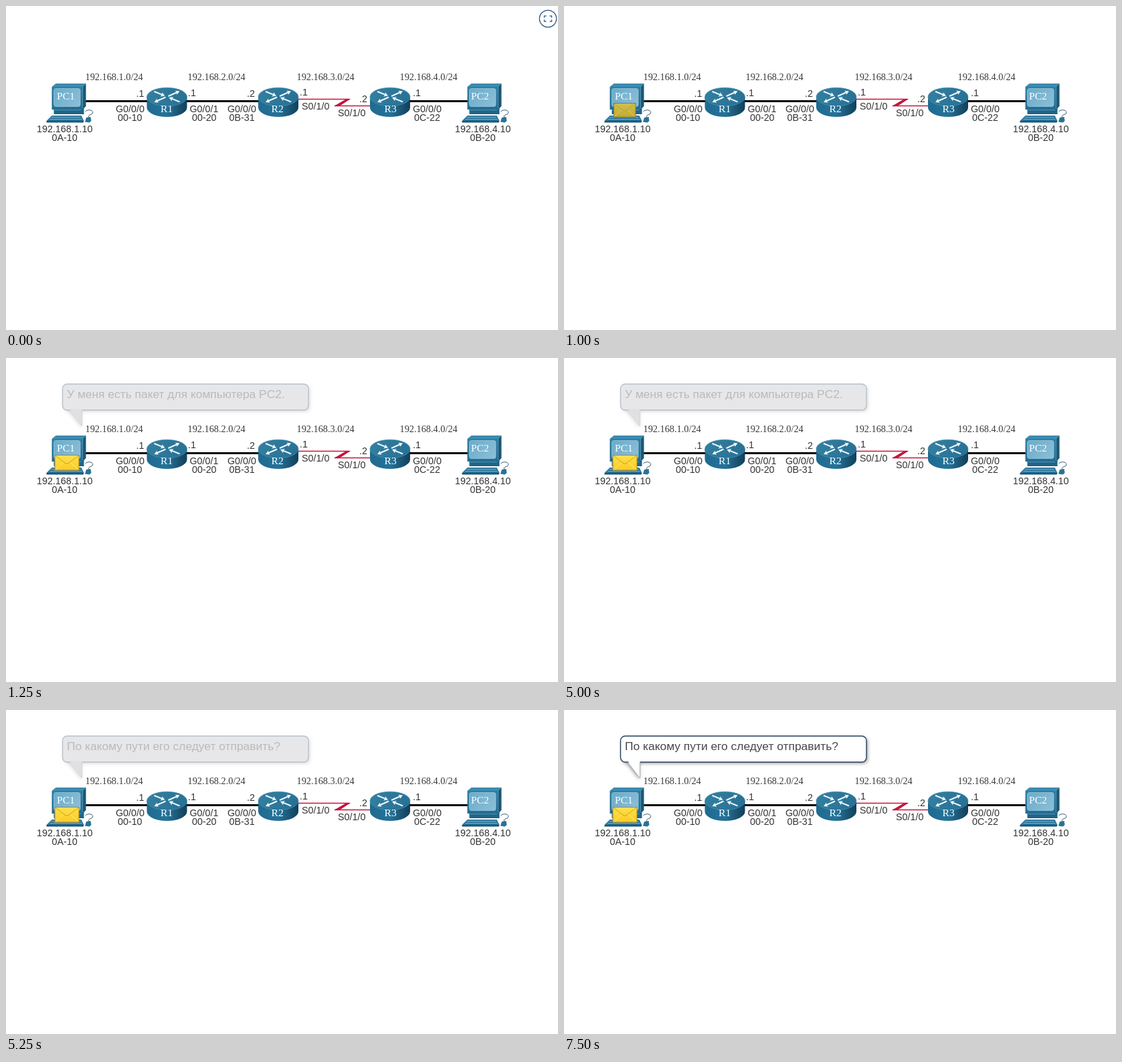
Recreate the animation shown at these times as an HTML page with a canvas. Size 825 by 485 pixels, loop 8 s.

```html
<!DOCTYPE html>
<html lang="ru">
<head>
<meta charset="utf-8">
<title>Packet path</title>
<style>
html, body { margin: 0; width: 100%; height: 100%; overflow: hidden; background: #fff; }
canvas, svg { position: absolute; left: 0; top: 0; width: 825px; height: 485px; }
.sans { font: 14.3px "Liberation Sans", Arial, sans-serif; fill: #333; }
.net { font: 14.3px "Liberation Serif", "Times New Roman", serif; fill: #3a3a3a; }
.dev { font: 15.6px "Liberation Serif", "Times New Roman", serif; fill: #fff; }
#say { font: 17.4px "Liberation Sans", Arial, sans-serif; }
</style>
</head>
<body>
<canvas width="825" height="485"></canvas>
<svg viewBox="0 0 825 485"><g id="labels"></g><text id="say" x="91" y="60"></text></svg>
<script>
const LOOP = 8000;
const ctx = document.querySelector('canvas').getContext('2d');
const say = document.getElementById('say');
const labels = document.getElementById('labels');

function label(cls, x, y, str) {
  const t = document.createElementNS('http://www.w3.org/2000/svg', 'text');
  t.setAttribute('class', cls);
  t.setAttribute('x', x);
  t.setAttribute('y', y);
  t.textContent = str;
  labels.append(t);
}

[118.5, 271.5, 434.5, 588.5].forEach((x, i) => label('net', x, 110.5, `192.168.${i + 1}.0/24`));
[['PC1', 76, 140], ['PC2', 695, 140], ['R1', 231, 159], ['R2', 396.5, 159], ['R3', 565.5, 159]]
  .forEach(([s, x, y]) => label('dev', x, y, s));
[
  ['192.168.1.10', 46, 189], ['0A-10', 68.5, 202],
  ['192.168.4.10', 671, 189], ['0B-20', 693.5, 202],
  ['.1', 194.5, 136], ['G0/0/0', 164, 159], ['00-10', 167, 172],
  ['.1', 272, 135], ['G0/0/1', 274.5, 159], ['00-20', 278, 172],
  ['.2', 360, 136], ['G0/0/0', 331, 159], ['0B-31', 333.5, 172],
  ['.1', 439, 134], ['S0/1/0', 442, 155],
  ['.2', 528, 144], ['S0/1/0', 496, 165],
  ['.1', 608, 135], ['G0/0/0', 608, 159], ['0C-22', 610, 172]
].forEach(([s, x, y]) => label('sans', x, y, s));

function poly(fill, ...pts) {
  ctx.fillStyle = fill;
  ctx.beginPath();
  for (let i = 0; i < pts.length; i += 2) ctx.lineTo(pts[i], pts[i + 1]);
  ctx.closePath();
  ctx.fill();
}

function line(color, width, ...pts) {
  ctx.strokeStyle = color;
  ctx.lineWidth = width;
  ctx.beginPath();
  for (let i = 0; i < pts.length; i += 2) ctx.lineTo(pts[i], pts[i + 1]);
  ctx.stroke();
}

function shade(x0, y0, x1, y1, ...colors) {
  const g = ctx.createLinearGradient(x0, y0, x1, y1);
  colors.forEach((c, i) => g.addColorStop(i / (colors.length - 1), c));
  return g;
}

function box(x, y, w, h, r) {
  ctx.beginPath();
  ctx.roundRect(x, y, w, h, r);
}

function pc(x) {
  ctx.save();
  ctx.translate(x, 0);
  // keyboard and stand
  poly('#1f6488', 3, 153, 48, 153, 48, 162, 3, 162);
  poly('#3f88ab', 3, 155, 44, 155, 44, 156.5, 3, 156.5);
  poly('#2b7499', 0, 164, 44, 164, 48, 172, -8, 172);
  poly('#1a5676', -8, 172, 48, 172, 47, 174.5, -8, 174.5);
  line('#7fb2ca', 1, -1, 166.5, 43, 166.5);
  line('#7fb2ca', 1, -3, 169.5, 45, 169.5);
  // monitor
  poly('#3d8bb0', 0, 121, 6, 116, 51, 116, 46, 121);
  poly('#1a5878', 46, 121, 51, 116, 51, 150, 46, 155);
  poly(shade(0, 121, 0, 155, '#2f7ea3', '#236c90'), 0, 121, 46, 121, 46, 155, 0, 155);
  box(3, 123.5, 39.5, 27, 3);
  ctx.fillStyle = shade(3, 124, 42, 151, '#6aaccb', '#8cbfd8');
  ctx.fill();
  ctx.strokeStyle = '#9ac6da';
  ctx.lineWidth = 0.8;
  ctx.stroke();
  // mouse
  ctx.strokeStyle = '#33576a';
  ctx.lineWidth = 1;
  ctx.beginPath();
  ctx.moveTo(50, 158);
  ctx.bezierCurveTo(55, 153, 64, 157, 60.5, 161);
  ctx.bezierCurveTo(58, 164, 54, 162, 55, 167);
  ctx.stroke();
  poly('#2c7192', 51.5, 167, 58, 166, 59, 172, 56, 174.5, 49.5, 173.5);
  ctx.restore();
}

function arrow(x0, y0, x1, y1) {
  ctx.save();
  ctx.translate(x1, y1);
  ctx.rotate(Math.atan2(y1 - y0, x1 - x0));
  const len = Math.hypot(x1 - x0, y1 - y0);
  poly('#f2f8fb', 0, 0, -6, -3.4, -5, -1, -len, -1, -len, 1, -5, 1, -6, 3.4);
  ctx.restore();
}

function router(x) {
  ctx.save();
  ctx.translate(x, 0);
  ctx.fillStyle = shade(-30, 0, 30, 0, '#206a8f', '#24739a', '#123f59');
  ctx.beginPath();
  ctx.moveTo(-30, 136);
  ctx.lineTo(-30, 152);
  ctx.ellipse(0, 152, 30, 14, 0, Math.PI, 0, true);
  ctx.lineTo(30, 136);
  ctx.fill();
  ctx.fillStyle = shade(-30, 122, 30, 150, '#33809f', '#276f95');
  ctx.beginPath();
  ctx.ellipse(0, 136, 30, 13.8, 0, 0, 7);
  ctx.fill();
  ctx.strokeStyle = '#4a8fb0';
  ctx.lineWidth = 0.7;
  ctx.stroke();
  arrow(-19, 128, -3, 134.5);
  arrow(19, 143.5, 3, 137);
  arrow(2, 135, 19, 127.5);
  arrow(-2, 136.5, -19, 144);
  ctx.restore();
}

function network() {
  [[118, 212], [269, 379], [602, 691]].forEach(([a, b]) => line('#000', 2.8, a, 142.5, b, 142.5));
  line('#c4143c', 1.5, 436, 139.5, 514, 139.5);
  line('#c4143c', 1.5, 491, 149.5, 546, 149.5);
  poly('#c4143c', 515, 139, 499, 149.5, 490, 150, 507, 140);
  pc(68.5);
  pc(689.5);
  [240.5, 407, 574].forEach(router);
}

function icon() {
  ctx.lineWidth = 1.3;
  ctx.strokeStyle = '#2f5478';
  ctx.fillStyle = '#fafcff';
  ctx.beginPath();
  ctx.arc(810, 19, 12.7, 0, 7);
  ctx.fill();
  ctx.stroke();
  for (const sx of [-1, 1]) for (const sy of [-1, 1])
    line('#2f5478', 1.3, 810 + sx * 2.5, 19 + sy * 4.2, 810 + sx * 5.5, 19 + sy * 4.2, 810 + sx * 5.5, 19 + sy * 1.6);
}

function envelope(full) {
  const [top, low, edge, fold, flap] = full
    ? ['#ffe04a', '#fccb22', '#a98a2c', '#ffe98c', '#c79f2a']
    : ['#d0be4e', '#c4ac2e', '#857b37', '#d9ca70', '#b4a23c'];
  const x = full ? 73 : 74.5, w = full ? 36 : 32.5, h = full ? 22.5 : 20.5;
  const mid = x + w / 2, y = 145.5;
  ctx.fillStyle = shade(0, y, 0, y + h, top, low);
  ctx.fillRect(x, y, w, h);
  line(fold, 1, x + 1, y + h - 1, x + w * 0.36, y + h * 0.48);
  line(fold, 1, x + w - 1, y + h - 1, x + w * 0.64, y + h * 0.48);
  line(flap, 1, x, y, mid - 3, y + h * 0.52, mid, y + h * 0.58, mid + 3, y + h * 0.52, x + w, y);
  ctx.strokeStyle = edge;
  ctx.strokeRect(x, y, w, h);
}

function bubble(faded) {
  const fill = faded ? '#e7e7e9' : '#fff';
  ctx.save();
  ctx.shadowColor = faded ? 'rgba(0,0,0,.15)' : 'rgba(0,0,0,.4)';
  ctx.shadowBlur = 5;
  ctx.shadowOffsetX = ctx.shadowOffsetY = 2;
  box(84.5, 39, 367.5, 39, 7);
  ctx.fillStyle = fill;
  ctx.fill();
  ctx.shadowOffsetX = -1;
  poly(fill, 94, 77, 114, 102.5, 114, 77);
  ctx.restore();
  box(84.5, 39, 367.5, 39, 7);
  ctx.fillStyle = fill;
  ctx.fill();
  ctx.strokeStyle = faded ? '#b9c0ca' : '#27405f';
  ctx.lineWidth = 1.4;
  ctx.stroke();
  poly(faded ? '#e0e0e2' : '#fff', 95.5, 76.5, 113.5, 101, 113.5, 76.5);
  line(faded ? '#d4d6d9' : '#a9afb5', 1, 95, 78, 113.5, 102, 113.5, 78);
}

function draw(t) {
  ctx.clearRect(0, 0, 825, 485);
  network();
  if (t < 500) icon();
  if (t >= 1000) envelope(t >= 1250);
  const faded = t < 1500 || (t >= 5000 && t < 5500);
  if (t >= 1250) bubble(faded);
  say.textContent = t < 1250 ? '' : t < 5250
    ? 'У меня есть пакет для компьютера PC2.'
    : 'По какому пути его следует отправить?';
  say.setAttribute('fill', faded ? '#bababc' : '#484848');
}

const start = performance.now();
function tick() {
  draw((performance.now() - start) % LOOP);
  requestAnimationFrame(tick);
}
tick();
</script>
</body>
</html>
```
